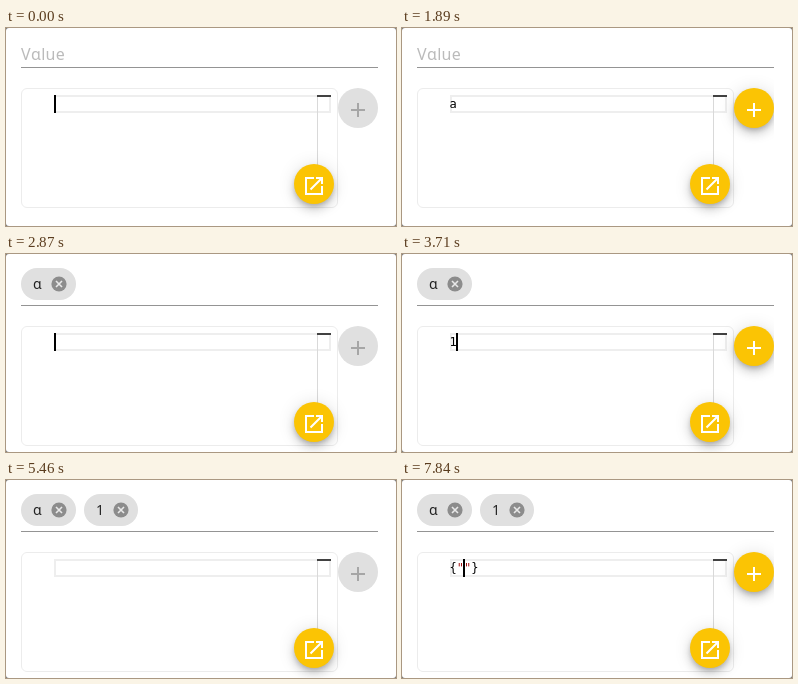
Write an HTML page that moves like this. It is 390 by 198 pixels and loops after 8 s.

```html
<!DOCTYPE html>
<html lang="en">
<head>
<meta charset="utf-8">
<title>Value list editor</title>
<style>
  html, body { margin: 0; width: 100%; height: 100%; overflow: hidden; background: #777; }
  #stage {
    position: relative; width: 390px; height: 198px; overflow: hidden;
    background: #fff; border-radius: 3px;
    font-family: "Noto Sans", "Open Sans", sans-serif;
  }
  #stage * { position: absolute; box-sizing: border-box; }
  #stage span { position: static; }
  [hidden] { display: none; }

  .label { left: 15px; top: 14px; font-size: 16px; line-height: 24px; font-weight: 500; letter-spacing: .35px; color: #bbb; }
  .rule { left: 15px; top: 39px; width: 357px; height: 1px; background: #949494; }
  .chip { top: 14px; height: 32px; border-radius: 16px; background: #e0e0e0; font-size: 14px; line-height: 32px; font-weight: 500; color: #222; }
  .chip b { left: 12px; font-weight: inherit; }
  .chip svg { right: 9px; top: 8px; }

  .lower { left: 0; top: 0; width: 390px; height: 198px; }
  .chips .lower { top: 12px; }
  .chips .rule { top: 51px; }
  .panel { left: 15px; top: 60px; width: 317px; height: 120px; border: 1px solid #ececec; border-radius: 6px; }
  .line { left: 48px; top: 67px; width: 277px; height: 18px; border: 2px solid #eee; }
  .ruler { left: 311px; top: 67px; width: 1px; height: 90px; background: #d9d9d9; }
  .mark { left: 311px; top: 67px; width: 14px; height: 2px; background: #424242; }
  .code { font: 12px/18px "DejaVu Sans Mono", monospace; color: #000; white-space: pre; }
  #text { left: 47.6px; top: 67px; }
  .str { color: #a31515; }
  #caret { top: 67px; width: 2px; height: 18px; background: #000; }
  #popup { left: 54px; top: 85px; width: 271px; height: 18px; background: #d6ebff; border: 1px solid #c4ccd4; }
  #popup .code { left: 26px; top: 0; line-height: 17px; }
  #popup .code span { color: #0066bf; font-weight: bold; }
  #popup svg { left: 7px; top: 3px; }

  .clip { left: 300px; top: 0; width: 72px; height: 186px; overflow: hidden; }
  .fab {
    width: 40px; height: 40px; border-radius: 50%; background: #fbc404;
    box-shadow: 0 3px 5px -1px #0003, 0 6px 10px #00000024, 0 1px 18px #0000001f;
  }
  .fab svg { left: 8px; top: 10px; fill: none; stroke: #fff; stroke-width: 2; }
  .open { left: 288px; top: 136px; }
  #add { left: 32px; top: 60px; }
  #add.off { background: #e0e0e0; box-shadow: none; }
  #add.off svg { stroke: #a6a6a6; }
  #add.press {
    background: #fccd24;
    box-shadow: 0 7px 8px -4px #0003, 0 12px 17px 2px #00000024, 0 5px 22px 4px #0000001f;
  }
</style>
</head>
<body>
<div id="stage">
  <div class="label" id="label">Vɑlue</div>
  <div class="chip" id="chipA" style="left:15px;width:55px"><b>ɑ</b></div>
  <div class="chip" id="chip1" style="left:78px;width:54px"><b>1</b></div>
  <div class="rule"></div>
  <div class="lower">
    <div class="panel"></div>
    <div class="line"></div>
    <div class="ruler"></div>
    <div class="mark"></div>
    <div class="code" id="text"></div>
    <div id="popup">
      <svg width="15" height="12" fill="none" stroke="#424242" stroke-width="1.2">
        <path d="M0 1.5H6M8 1.5H13M0 4.5H3M5 4.5H9M0 7.5H7M9 7.5H14M0 10.5H4M6 10.5H14"/>
      </svg>
      <div class="code"><span>a</span>nd</div>
    </div>
    <div id="caret"></div>
    <div class="clip">
      <div class="fab" id="add"><svg width="24" height="24"><path d="M12 5V19M5 12H19"/></svg></div>
    </div>
    <div class="fab open">
      <svg width="24" height="24"><path d="M12 4H4V20H20V12M14 4H20V10M20 4L8.5 15.5"/></svg>
    </div>
  </div>
</div>
<script>
const LOOP = 8000;
const CARET_X = [48, 54, 61];
const $ = id => document.getElementById(id);

for (const chip of document.querySelectorAll('.chip')) {
  chip.insertAdjacentHTML('beforeend',
    `<svg width="16" height="16"><circle cx="8" cy="8" r="7.6" fill="#8c8c8c"/>
     <path d="M5 5L11 11M11 5L5 11" stroke="#e8e8e8" stroke-width="1.6"/></svg>`);
}

// Each step: time in ms, then what changes
const steps = [
  [0, { text: '', col: 0, caret: true, add: 'off', popup: false, chips: 0, tinted: false }],
  [210, { caret: false }],
  [770, { text: 'a', col: 1, caret: true, add: '' }],
  [840, { popup: true }],
  [1260, { caret: false }],
  [1820, { caret: true }],
  [1890, { caret: false, popup: false }],
  [1960, { add: 'press' }],
  [2100, { text: '', col: 0, add: 'off', chips: 1 }],
  [2870, { caret: true }],
  [3430, { caret: false }],
  [3710, { text: '1', col: 1, caret: true, add: '' }],
  [4200, { caret: false }],
  [4410, { add: 'press' }],
  [4550, { text: '', col: 0, add: 'off', chips: 2 }],
  [4970, { caret: true }],
  [5460, { caret: false }],
  [6020, { caret: true }],
  [6300, { text: '{}', col: 1 }],
  [6440, { add: '' }],
  [6860, { caret: false }],
  [7420, { caret: true }],
  [7770, { text: '{""}', col: 2 }],
  [7840, { tinted: true }]
];

function render(t) {
  const s = {};
  for (const [at, change] of steps) if (at <= t) Object.assign(s, change);
  $('text').innerHTML = s.tinted ? s.text.replace('""', '<span class="str">""</span>') : s.text;
  $('caret').hidden = !s.caret;
  $('caret').style.left = CARET_X[s.col] + 'px';
  $('popup').hidden = !s.popup;
  $('add').className = 'fab ' + s.add;
  $('label').hidden = s.chips > 0;
  $('chipA').hidden = s.chips < 1;
  $('chip1').hidden = s.chips < 2;
  $('stage').className = s.chips ? 'chips' : '';
}

function frame() {
  render(performance.now() % LOOP);
  requestAnimationFrame(frame);
}
frame();
</script>
</body>
</html>
```
